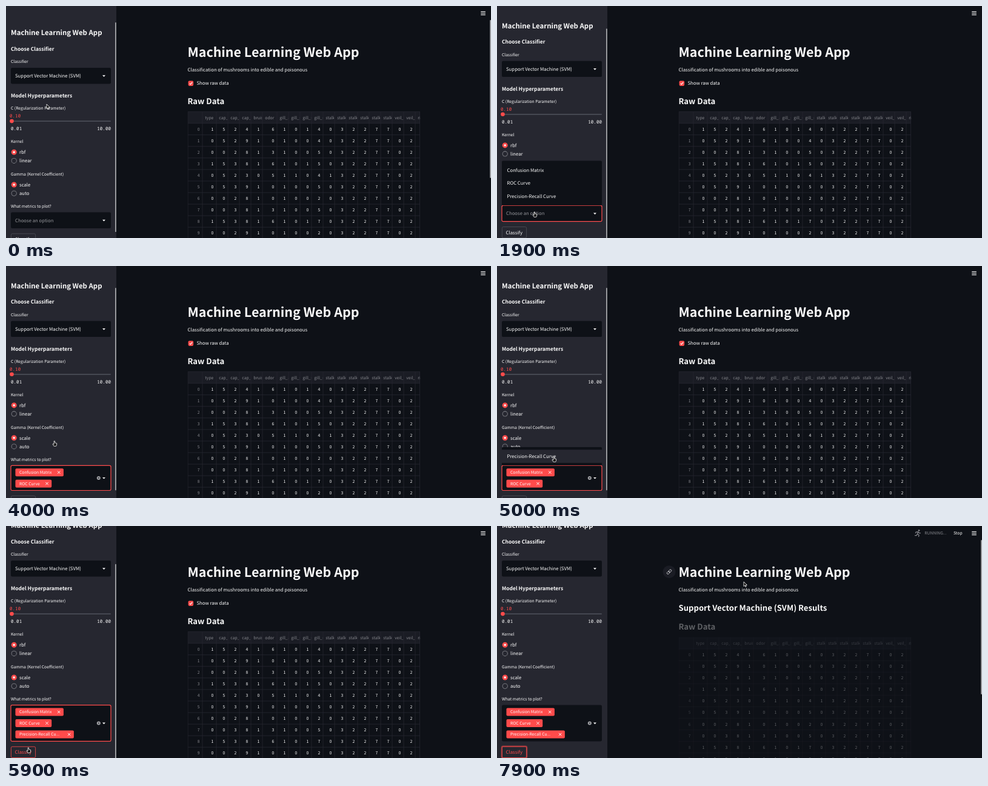
Animation of 800 by 383 pixels, one loop 8 s. Source, as an HTML page with a canvas:

```html
<!DOCTYPE html>
<html lang="en">
<head>
<meta charset="utf-8">
<title>Machine Learning Web App</title>
<style>
html, body { margin: 0; width: 100%; height: 100%; overflow: hidden; background: #0e1117; }
canvas { display: block; }
</style>
</head>
<body>
<canvas id="stage" width="800" height="383"></canvas>
<script>
const ctx = document.getElementById('stage').getContext('2d');
const SANS = '"Noto Sans CJK JP","Noto Sans CJK SC","Noto Sans CJK",sans-serif';
const MONO = '"Noto Sans Mono","DejaVu Sans Mono",monospace';
const BG = '#0e1117', PANEL = '#262730', RED = '#ff4b4b', WHITE = '#fafafa', GRAY = '#85868c', HEAD = '#1a1c24';
const BODY = 7.76, SMALL = 6.79;
const LOOP = 8000;

const METRICS = ['Confusion Matrix', 'ROC Curve', 'Precision-Recall Curve'];
const PICKS = [2450, 3900, 5200];
const MENUS = [[1900, 2450], [3300, 3900], [4700, 5200]];
const BOX_TOP = 340.6, BOX_H = [26.4, 26.4, 41.2, 59.8];
const CLICK = 6100, RUN = 6250, RESULT = 6400;

const COLS = ['type', 'cap_shape', 'cap_surface', 'cap_color', 'bruises', 'odor', 'gill_attach', 'gill_spacing',
  'gill_size', 'gill_color', 'stalk_shape', 'stalk_root', 'stalk_above', 'stalk_below', 'stalk_color',
  'stalk_color', 'veil_type', 'veil_color', 'ring_number'];
const ROWS = ['15241610140', '05291010040', '00281310050', '15381610150', '05230511041',
  '05391010050', '00281010020', '00381310050', '15381610170', '00291010020'].map(r => r + '3227702');

// time, x, y, pointer shape
const PATH = [
  [0, 67, 162, 'arrow'], [200, 67, 162, 'arrow'], [800, 40, 312, 'arrow'], [1100, 37, 319, 'arrow'],
  [1400, 40, 322, 'arrow'], [1800, 62, 342, 'hand'], [1950, 62, 342, 'hand'], [2350, 76, 268, 'hand'],
  [2500, 76, 268, 'hand'], [2900, 84, 346, 'hand'], [3050, 84, 346, 'hand'], [3250, 115, 343, 'hand'],
  [3350, 115, 343, 'hand'], [3750, 80, 291, 'hand'], [4000, 80, 291, 'hand'], [4500, 112, 345, 'hand'],
  [4750, 112, 345, 'hand'], [4950, 94, 317, 'hand'], [5300, 93, 316, 'hand'], [5750, 37, 368, 'hand'],
  [6150, 37, 368, 'arrow'], [6400, 350, 190, 'arrow'], [6550, 381, 135, 'beam'], [7000, 383, 134, 'beam'],
  [7500, 407, 92, 'arrow'], [8000, 407, 92, 'arrow']];

const clamp = v => Math.max(0, Math.min(1, v));
const ease = v => (v = clamp(v), v * v * (3 - 2 * v));
const ramp = (t, a, b) => ease((t - a) / (b - a));
const during = (t, [a, b]) => t >= a && t < b;

// y is the middle of the capital letters
function text(str, x, y, size = BODY, color = WHITE, { weight = 400, align = 'left', font = SANS } = {}) {
  ctx.font = `${weight} ${size}px ${font}`;
  ctx.textAlign = align;
  ctx.fillStyle = color;
  ctx.fillText(str, x, y + size * 0.366);
}
const bold = (str, x, y, size, color) => text(str, x, y, size, color, { weight: 700 });

function rect(x, y, w, h, fill, r = 0, stroke, lw = 1) {
  ctx.beginPath();
  ctx.roundRect(x, y, w, h, r);
  if (fill) { ctx.fillStyle = fill; ctx.fill(); }
  if (stroke) { ctx.strokeStyle = stroke; ctx.lineWidth = lw; ctx.stroke(); }
}

function disc(x, y, r, fill) {
  ctx.beginPath();
  ctx.arc(x, y, r, 0, 7);
  ctx.fillStyle = fill;
  ctx.fill();
}

function lines(color, width, ...paths) {
  ctx.beginPath();
  for (const p of paths)
    for (let i = 0; i < p.length; i += 2) ctx[i ? 'lineTo' : 'moveTo'](p[i], p[i + 1]);
  ctx.strokeStyle = color;
  ctx.lineWidth = width;
  ctx.stroke();
}

function shape(fill, stroke, pts) {
  ctx.beginPath();
  for (let i = 0; i < pts.length; i += 2) ctx.lineTo(pts[i], pts[i + 1]);
  ctx.closePath();
  ctx.fillStyle = fill;
  ctx.fill();
  if (stroke) { ctx.strokeStyle = stroke; ctx.lineWidth = 0.8; ctx.stroke(); }
}

const cross = (x, y, r, color, w = 1) =>
  lines(color, w, [x - r, y - r, x + r, y + r], [x - r, y + r, x + r, y - r]);
const caret = y => shape(WHITE, null, [159, y - 1, 164, y - 1, 161.5, y + 1.7]);

function radio(label, y, on) {
  disc(13.2, y, 4.5, on ? RED : '#8b8c92');
  disc(13.2, y, on ? 1.7 : 3.7, on ? WHITE : PANEL);
  text(label, 22, y);
}

// long names are cut to the widest tag
function tag(label, y) {
  const maxWidth = 70.3;
  ctx.font = `400 ${SMALL}px ${SANS}`;
  const width = ctx.measureText(label).width;
  const end = 22 + Math.min(width, maxWidth) + 11.9;
  rect(15.5, y - 6.5, end - 7.8, 13, RED, 2);
  text(width > maxWidth ? label.slice(0, -3) + '...' : label, 22, y, SMALL);
  cross(end, y, 2.2, WHITE);
}

function multiselect(n, focus) {
  const h = BOX_H[n], mid = BOX_TOP + h / 2;
  rect(8, BOX_TOP, 165, h, BG, 2.2, focus && RED, 1.2);
  caret(mid);
  if (!n) text('Choose an option', 15, mid, BODY, '#94959a');
  else {
    disc(152.8, mid, 3, '#a3a4a8');
    cross(152.8, mid, 1.2, BG, 0.8);
  }
  for (let i = 0; i < n; i++) tag(METRICS[i], mid + (i - (n - 1) / 2) * 18.5);
}

function menu(n, pointerY) {
  const left = METRICS.slice(n), step = 21.7, h = left.length * step + 8.6, top = BOX_TOP - h;
  rect(8, top, 165, h, BG, 2);
  left.forEach((name, i) => {
    const y = top + 4.3 + i * step;
    if (left.length === 1 || (pointerY >= y && pointerY < y + step)) rect(8, y, 165, step, PANEL);
    text(name, 16.5, y + step / 2);
  });
}

function sidebar(t, pointer) {
  const n = PICKS.filter(p => t >= p).length;
  const scroll = 11.3 * ramp(t, 400, 700) + 33.7 * ramp(t, 5220, 5380);
  ctx.save();
  ctx.beginPath();
  ctx.rect(0, 0, 182, 383);
  ctx.clip();
  rect(0, 0, 182, 383, PANEL);
  ctx.translate(0, -scroll);

  bold('Machine Learning Web App', 8, 44, 11.39);
  bold('Choose Classifier', 8, 70.5, 8.5);
  text('Classifier', 8, 91.7, SMALL);
  rect(8, 102, 165, 26.4, BG, 2.2);
  text('Support Vector Machine (SVM)', 15, 115.3);
  caret(115.3);

  bold('Model Hyperparameters', 8, 147.7, 8.5);
  text('C (Regularization Parameter)', 8, 168.5, SMALL);
  text('0.10', 6, 181.4, 7.58, RED, { font: MONO });
  rect(9.5, 189.2, 163.5, 1.8, '#4a4c56', 1);
  disc(9.5, 190.1, 3.3, RED);
  text('0.01', 8, 202.3, 7.58, WHITE, { font: MONO });
  text('10.00', 173, 202.3, 7.58, WHITE, { font: MONO, align: 'right' });

  text('Kernel', 8, 224, SMALL);
  radio('rbf', 241.2, true);
  radio('linear', 255.4, false);
  text('Gamma (Kernel Coefficient)', 8, 277.5, SMALL);
  radio('scale', 295, true);
  radio('auto', 309.2, false);
  text('What metrics to plot?', 8, 330.7, SMALL);

  multiselect(n, during(t, [1900, CLICK]));

  const by = BOX_TOP + BOX_H[n] + 8.6, hot = t >= 5700;
  if (t >= CLICK) rect(7.7, by - 0.4, 41.6, 19.6, null, 2.4, 'rgba(255,75,75,.5)', 2);
  rect(8.4, by + 0.3, 40.2, 18.2, null, 2, hot ? RED : '#50515a', 0.8);
  text('Classify', 14.6, by + 9.4, BODY, hot ? RED : WHITE);

  if (MENUS.some(m => during(t, m))) menu(n, pointer.y + scroll);
  ctx.restore();

  ctx.globalAlpha = 1 - ramp(t, 6700, 7000);
  const full = 424 + BOX_H[n] - BOX_H[0];
  rect(180, (scroll + 30) * 383 / full, 1.8, 383 * 383 / full, '#a5a6aa', 1);
  ctx.globalAlpha = 1;
}

function table(top) {
  const rowH = 19.06, right = 683, line = '#262831';
  const width = i => i === 0 ? 23 : i === 5 ? 24 : 19;
  ctx.save();
  ctx.beginPath();
  ctx.rect(299.5, top - 0.5, right - 299.5, 383);
  ctx.clip();
  rect(300, top, 383, rowH, HEAD);
  for (let r = 0; r <= 11; r++) lines(line, 0.8, [300, top + r * rowH, right, top + r * rowH]);
  lines(line, 0.8, [300, top, 300, 383], [324, top, 324, 383], [682.6, top, 682.6, 383]);
  const end = { align: 'right' };
  ROWS.forEach((_, r) => text(r, 319.6, top + (r + 1.5) * rowH, SMALL, GRAY, end));
  let x = 324;
  COLS.forEach((name, i) => {
    const w = width(i);
    ROWS.forEach((row, r) => text(row[i] ?? '', x + w - 4.7, top + (r + 1.5) * rowH, SMALL, WHITE, end));
    ctx.save();
    ctx.beginPath();
    ctx.rect(x, top, w - 0.6, rowH);
    ctx.clip();
    text(name, x + 4.3, top + rowH / 2, SMALL, GRAY);
    ctx.restore();
    x += w;
    lines(line, 0.8, [x, top, x, 383]);
  });
  ctx.restore();
}

function anchor(y, alpha) {
  if (alpha <= 0) return;
  ctx.save();
  ctx.globalAlpha = alpha;
  disc(284, y, 10.5, HEAD);
  ctx.translate(284, y);
  ctx.rotate(-Math.PI / 4);
  rect(-4.6, -1.7, 5.2, 3.4, null, 1.7, '#c9cacd', 0.9);
  rect(-0.6, -1.7, 5.2, 3.4, null, 1.7, '#c9cacd', 0.9);
  ctx.restore();
}

function expandIcon(y, alpha) {
  if (alpha <= 0) return;
  ctx.globalAlpha = alpha;
  disc(698, y, 10.5, HEAD);
  lines(WHITE, 1, [695, y - 3, 701, y + 3]);
  shape(WHITE, null, [694.3, y - 3.7, 697.6, y - 3.7, 694.3, y - 0.4]);
  shape(WHITE, null, [701.7, y + 3.7, 698.4, y + 3.7, 701.7, y + 0.4]);
  ctx.globalAlpha = 1;
}

function status() {
  const c = '#85868c';
  disc(696, 7.3, 1.4, c);
  lines(c, 1.2, [694.9, 9.6, 693.4, 13, 696, 15, 695.4, 18], [693.4, 13, 692, 15.6, 689, 15.6],
    [690.2, 12, 691.2, 9.8, 694.9, 9.6, 696.4, 11.6, 698.8, 11.6]);
  text('RUNNING...', 705.3, 12, SMALL, c);
  text('Stop', 753, 12, SMALL);
}

function mainArea(t) {
  const done = t >= RESULT, shift = done ? 9.5 : 0;
  bold('Machine Learning Web App', 299.5, 76.2, 21.4);
  text('Classification of mushrooms into edible and poisonous', 299.5, 105.4);
  if (done) bold('Support Vector Machine (SVM) Results', 299.5, 135.2, 13.1);
  else {
    rect(300.6, 123.4, 8.5, 8.5, RED, 1.8);
    lines(WHITE, 1.2, [302.7, 127.8, 304.3, 129.4, 307.2, 125.8]);
    text('Show raw data', 314.5, 127.6);
  }

  ctx.globalAlpha = 1 - 0.66 * ramp(t, 7100, 7800);
  bold('Raw Data', 299.5, 157 + shift, 13.1);
  table(174.6 + shift);
  ctx.globalAlpha = 1;

  if (done) {
    const fade = 1 - ramp(t, 7100, 7400);
    anchor(135, fade);
    anchor(166, 1 - ramp(t, 6700, 6900));
    anchor(75.7, ramp(t, 7350, 7500));
    expandIcon(191.3, fade);
    if (t < 7000) lines('#c4c5c8', 1.2, [681.3, 185, 681.3, 200]);
  }
  if (t >= RUN) status();
  for (const y of [9.4, 12, 14.6]) lines(WHITE, 1.1, [783.2, y, 790.8, y]);

  ctx.globalAlpha = t < 3000 ? 1 - ramp(t, 400, 700) : ramp(t, 6200, 6300);
  rect(798.2, 23, 1.8, t < 3000 ? 261 : 255, '#a5a6aa', 1);
  ctx.globalAlpha = 1;
}

function pointerAt(t) {
  const i = Math.max(1, PATH.findIndex(p => p[0] > t));
  const [t0, x0, y0, kind] = PATH[i - 1], [t1, x1, y1] = PATH[i];
  const k = ramp(t, t0, t1);
  return { x: x0 + (x1 - x0) * k, y: y0 + (y1 - y0) * k, kind };
}

function drawPointer({ x, y, kind }) {
  ctx.save();
  ctx.translate(x, y);
  if (kind === 'beam') lines(WHITE, 0.9, [0, -4, 0, 4], [-1.5, -4, 1.5, -4], [-1.5, 4, 1.5, 4]);
  else if (kind === 'arrow')
    shape('#111', WHITE, [0, 0, 0, 7.6, 1.8, 6, 3, 8.6, 4.2, 8, 3, 5.5, 5.4, 5.4]);
  else
    shape('#111', WHITE, [-0.9, -2, 0.5, -2, 0.8, 1, 3.8, 1.8, 3.4, 5, 2.7, 6.4, -1, 6.4, -3, 3.2, -2.4, 2.4, -0.9, 3.4]);
  ctx.restore();
}

function draw() {
  const t = performance.now() % LOOP;
  const pointer = pointerAt(t);
  ctx.textRendering = 'geometricPrecision';
  rect(0, 0, 800, 383, BG);
  mainArea(t);
  sidebar(t, pointer);
  drawPointer(pointer);
  requestAnimationFrame(draw);
}
draw();
</script>
</body>
</html>
```
